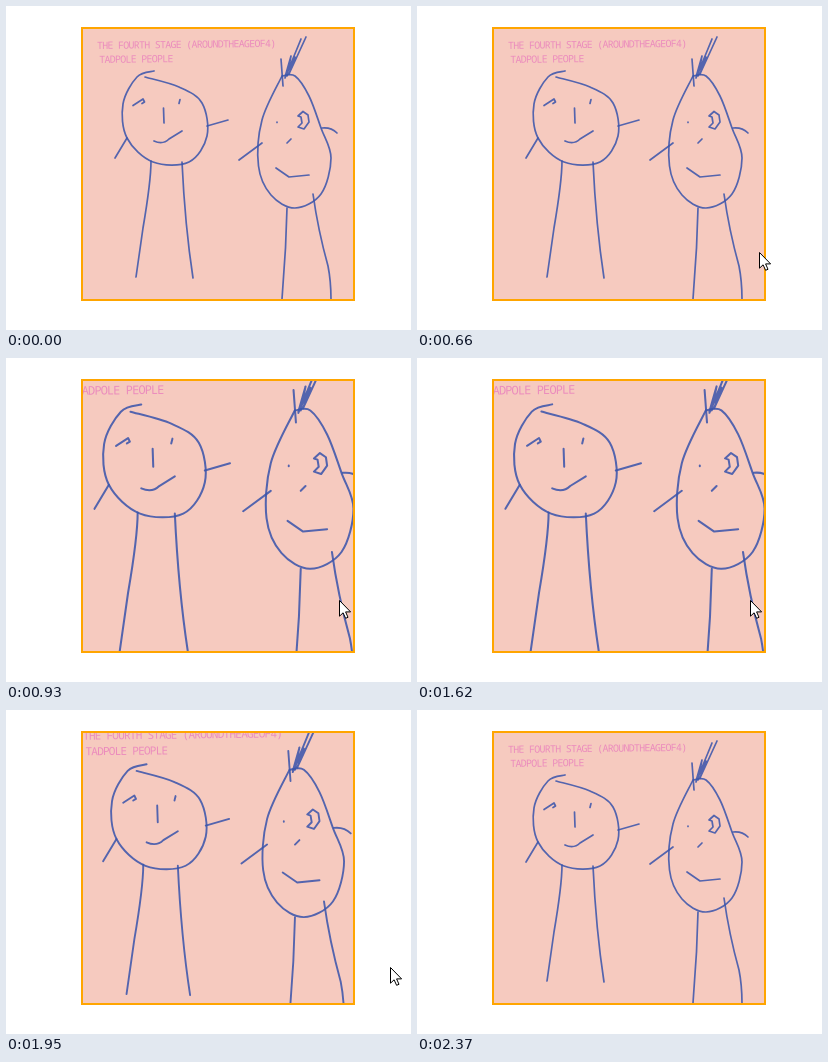
Animation of 405 by 324 pixels, one loop 2.91 s. Source, as an HTML page with a canvas:

```html
<!DOCTYPE html>
<html lang="en">
<head>
<meta charset="utf-8">
<title>Hover zoom</title>
<style>
html, body { margin: 0; width: 100%; height: 100%; overflow: hidden; background: #fff; }
canvas { display: block; width: 405px; height: 324px; }
</style>
</head>
<body>
<canvas id="stage"></canvas>
<script>
const W = 405, H = 324, LOOP = 2910, TICK = 30;
const BOX = { x: 77, y: 23, size: 270, border: 2 };
const CX = BOX.x + BOX.size / 2, CY = BOX.y + BOX.size / 2;
const ZOOM = 0.2, FADE = 250, ZOOM_IN = 690, ZOOM_OUT = 1838;
const ENTER = 180, REST = 840, LEAVE = 1600, AWAY = 2040, GONE = 2370;
const INK = 'rgba(58, 84, 172, .86)', PINK = '#eb8bbd', PAPER = '#f6cabf', FRAME = '#ffa500';

const canvas = document.getElementById('stage');
const ctx = canvas.getContext('2d');
const dpr = window.devicePixelRatio || 1;
canvas.width = W * dpr;
canvas.height = H * dpr;

// Smooth curve through every point of "x,y x,y ..."
function spline(text) {
  const p = text.split(' ').map(s => s.split(',').map(Number));
  const path = new Path2D();
  path.moveTo(...p[0]);
  for (let i = 0; i < p.length - 1; i++) {
    const a = p[i - 1] || p[i], b = p[i], c = p[i + 1], d = p[i + 2] || c;
    path.bezierCurveTo(
      b[0] + (c[0] - a[0]) / 6, b[1] + (c[1] - a[1]) / 6,
      c[0] - (d[0] - b[0]) / 6, c[1] - (d[1] - b[1]) / 6, ...c);
  }
  return path;
}

const strokes = [
  // left: head, face, arms, legs
  spline('148,65 131,71 117,98 121,132 147,156 183,156 201,130 196,97 173,81 139,71'),
  new Path2D('M127 99.5L137 93L138.5 96L136 97.5M157.5 102L158 117M174 93.5L173 97.5M148 135Q157 139 163 133L176 125'),
  new Path2D('M121 132L109 152M201 120L222 114'),
  new Path2D('M145 155Q145 175 137 222L130 271M176 156Q179 220 187 272'),
  // right: head, face, arms, legs, hair
  spline('276,70 289,70 303,90 315,122 325,152 315,188 289,202 265,189 252.5,160 256,114 276,70'),
  new Path2D('M271 116V116.5M292 110L297 105.5L302 109L303 116L298 123L292 121L296 117L295 111ZM281 137L285 133M270 162L283 171L303 169'),
  new Path2D('M233 154L256 137M316 122Q325 121 331 127'),
  new Path2D('M281 202L279.5 242L276 293M307 188Q312 224 322 260Q325 275 325 294'),
  new Path2D('M275 53L277 80M295 33L279 72M300 31L283 68L289 51L279 71L285 50L281 70')
];

const arrow = new Path2D('M.5 .5V16.2L4.1 12.8L6.6 18.3L9 17.3L6.6 11.9H11.6Z');

function progress(t, start, end) {
  return Math.min(1, Math.max(0, (t - start) / (end - start)));
}

function ease(t, start, end) {
  const f = progress(t, start, end);
  return f * f * (3 - 2 * f);
}

// Slows down along a curve into the box, then glides out again
function pointerAt(t) {
  const e = 1 - (1 - progress(t, ENTER, REST)) ** 2;
  const out = ease(t, LEAVE, AWAY);
  const bend = (a, b, c) => (1 - e) ** 2 * a + 2 * e * (1 - e) * b + e * e * c;
  return [
    Math.round(bend(401, 396, 333) + 57 * out),
    Math.round(bend(206, 272, 242) + 17 * out)
  ];
}

function drawCaption() {
  ctx.font = '10px "Noto Sans Mono", "DejaVu Sans Mono", monospace';
  ctx.letterSpacing = '-0.75px';
  ctx.fillStyle = PINK;
  ctx.save();
  ctx.translate(91, 43);
  ctx.rotate(-0.012);
  ctx.fillText('THE FOURTH STAGE (AROUNDTHEAGEOF4)', 0, 0);
  ctx.fillText('TADPOLE PEOPLE', 2, 14);
  ctx.restore();
}

function drawPicture(scale) {
  ctx.save();
  ctx.beginPath();
  ctx.rect(BOX.x, BOX.y, BOX.size, BOX.size);
  ctx.clip();
  ctx.fillStyle = PAPER;
  ctx.fillRect(BOX.x, BOX.y, BOX.size, BOX.size);
  ctx.translate(CX, CY);
  ctx.scale(scale, scale);
  ctx.translate(-CX, -CY);
  drawCaption();
  ctx.lineCap = ctx.lineJoin = 'round';
  ctx.strokeStyle = INK;
  ctx.lineWidth = 1.7;
  for (const path of strokes) ctx.stroke(path);
  ctx.restore();
}

function drawPointer(t) {
  ctx.save();
  ctx.translate(...pointerAt(t));
  ctx.fillStyle = '#fff';
  ctx.strokeStyle = '#000';
  ctx.lineWidth = 1;
  ctx.fill(arrow);
  ctx.stroke(arrow);
  ctx.restore();
}

function draw(t) {
  ctx.setTransform(dpr, 0, 0, dpr, 0, 0);
  ctx.fillStyle = '#fff';
  ctx.fillRect(0, 0, W, H);
  const b = BOX.border;
  ctx.fillStyle = FRAME;
  ctx.fillRect(BOX.x - b, BOX.y - b, BOX.size + 2 * b, BOX.size + 2 * b);
  const zoom = ease(t, ZOOM_IN, ZOOM_IN + FADE) - ease(t, ZOOM_OUT, ZOOM_OUT + FADE);
  drawPicture(1 + ZOOM * zoom);
  if (t >= ENTER && t < GONE) drawPointer(t);
}

const began = performance.now();
function tick() {
  const t = (performance.now() - began) % LOOP;
  draw(Math.floor(t / TICK) * TICK);
  requestAnimationFrame(tick);
}
tick();
</script>
</body>
</html>
```
